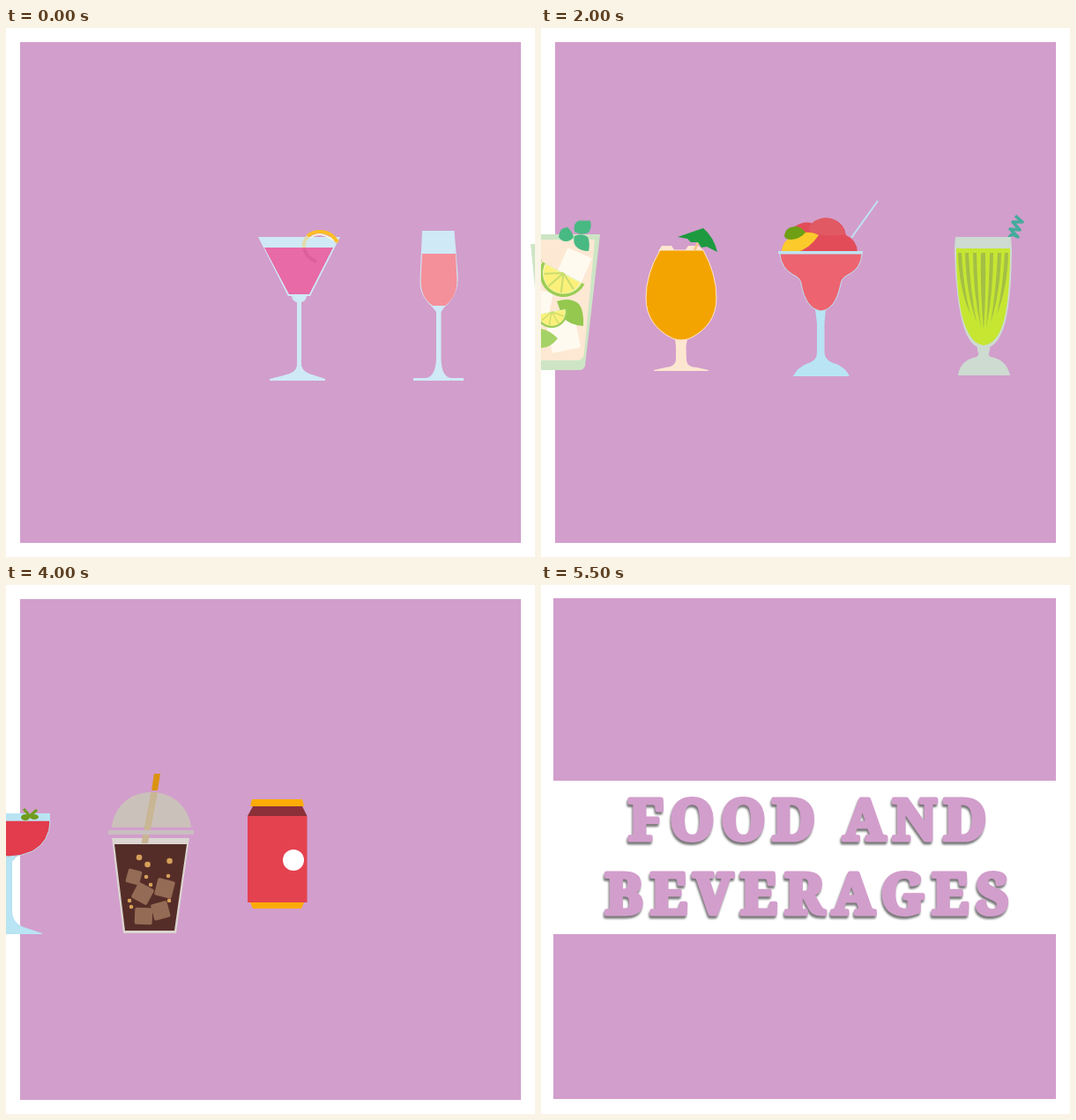
An HTML page that plays this animation: 600x600 px, repeating every 6000 ms.

```html
<!DOCTYPE html>
<html lang="en">
<head>
<meta charset="utf-8">
<title>Food and beverages</title>
<style>
  html, body { margin: 0; width: 100%; height: 100%; overflow: hidden; background: #fff; }
  svg { display: block; width: 100vw; height: 100vh; }

  .row { animation: slide 6s step-end infinite, fade 6s step-end infinite; }
  .ghost {
    filter: brightness(0) invert(1);
    animation: slide 6s step-end infinite, ghost 6s step-end infinite;
  }
  .banner { animation: banner 6s step-end infinite; }
  .title {
    font: 700 64px "Noto Serif", "Liberation Serif", serif;
    text-anchor: middle;
    fill: #d29ecc; stroke: #d29ecc; stroke-width: 5; stroke-linejoin: round;
    filter: drop-shadow(-1px 3px 1px #777);
    animation: title 6s step-end infinite;
  }

  /* One jump per drink, each with its own small vertical shift */
  @keyframes slide {
    0%      { transform: translate(636px, 11px); }
    8.333%  { transform: translate(453px, 14px); }
    16.666% { transform: translate(301px, 1px); }
    25%     { transform: translate(150px, 0); }
    33.333% { transform: translate(0, 0); }
    41.666% { transform: translate(-192px, 0); }
    50%     { transform: translate(-360px, -8px); }
    58.333% { transform: translate(-534px, 1px); }
    66.666%, 100% { transform: translate(-659px, 1px); }
  }
  @keyframes fade {
    0%      { opacity: 1; }
    75%     { opacity: .833; }
    78.333% { opacity: .667; }
    81.666% { opacity: .5; }
    85%     { opacity: .333; }
    88.333% { opacity: .167; }
    91.666%, 100% { opacity: 0; }
  }
  @keyframes ghost {
    0% { opacity: 0; }
    75% { opacity: 1; }
    85%, 100% { opacity: 0; }
  }
  @keyframes banner {
    0% { opacity: 0; }
    81.666% { opacity: .5; }
    85%, 100% { opacity: 1; }
  }
  @keyframes title {
    0% { opacity: 0; }
    91.666%, 100% { opacity: 1; }
  }
</style>
</head>
<body>
<svg viewBox="0 0 600 600">
  <defs>
    <clipPath id="band"><rect y="222" width="600" height="174"/></clipPath>

    <g id="lime">
      <path fill="#9ccd55" d="M-27 0A27 27 0 0 0 27 0Z"/>
      <path fill="#f7f8c4" d="M-23.500 0A23.500 23.500 0 0 0 23.500 0Z"/>
      <path fill="#fbf07a" d="M-22 1A22 22 0 0 0 22 1Z"/>
      <path stroke="#c9dd70" stroke-width="2" d="M0 0L-19 11M0 0L-8 21M0 0L8 21M0 0L19 11"/>
    </g>

    <g id="martini">
      <path fill="#cfe9f6" d="M286 237H379L345 304H341Q340 310 335 311V383Q337 391 350 394L362 398V400H299V398L315 394Q329 391 330 383V311Q325 310 324 304H320Z"/>
      <path fill="#e86aa6" d="M293 249H371L344 302H321Z"/>
      <g fill="none" stroke-width="4">
        <path stroke="#de609b" d="M338 250Q341 261 352 265"/>
        <path stroke="#e2ddab" d="M343 236Q337 241 338 249"/>
        <path stroke="#fdbd27" d="M342 236Q348 231 356 231Q369 231 376 243"/>
        <path stroke="#fff6dc" stroke-width="1.500" d="M345 238Q357 229 371 241"/>
      </g>
    </g>

    <g id="flute" fill="#cfe9f6">
      <path d="M472 230H508.500L512.500 280Q514 303 497 317L493.500 322V375Q494 396 505 397H519V400H462V397H476Q487 396 488 375V322L484 317Q468 303 469.500 285Z"/>
      <path fill="#f4909a" d="M472 256H510L511.500 285Q512 305 498 315H484Q470 306 470.500 285Z"/>
    </g>

    <g id="mojito">
      <path fill="#cde5c5" d="M260 235H368L351 384Q350 389 344 389H282Q276 389 275 384Z"/>
      <path fill="#fde8d3" d="M265 241H362L350 370Q349 378 342 378H286Q279 378 278 370Z"/>
      <g fill="#fffaf0">
        <rect x="268" y="252" width="31" height="33" rx="2" transform="rotate(-10 283 268)"/>
        <rect x="280" y="298" width="32" height="32" rx="2" transform="rotate(12 296 314)"/>
        <rect x="310" y="334" width="33" height="33" rx="2" transform="rotate(-12 326 350)"/>
        <rect x="324" y="255" width="30" height="30" rx="2" transform="rotate(24 339 270)"/>
      </g>
      <g fill="#a5d266">
        <path d="M275 281Q275 262 288 261Q295 259 302 264Q298 280 287 280Q280 278 275 281Z"/>
        <path fill="#94c84f" d="M319 311Q334 306 344 314Q350 322 349 339Q333 338 326 329Q322 320 319 311Z"/>
        <path d="M283 357Q290 343 301 342Q311 344 320 353Q311 365 299 364Q290 363 283 357Z"/>
      </g>
      <use href="#lime" transform="translate(326.500 279) rotate(28)"/>
      <use href="#lime" transform="translate(313 323) rotate(-11) scale(.67)"/>
      <g fill="#48b982">
        <path d="M321 238Q322 227 331 227Q336 231 338 238Q335 243 329 243Q324 243 321 238Z"/>
        <path d="M339 232Q337 222 344 219.500H357Q359 228 355 233Q347 237 339 232Z"/>
        <path d="M339 237Q347 233 354 238Q357 245 355 254Q345 254 340 248Q337 243 339 237Z"/>
      </g>
    </g>

    <g id="juice" fill="#fde6d0">
      <path d="M434 254L438 248H449L453 254ZM464 254L468 248H480L486 254Z"/>
      <path d="M453 354H467L465.500 362L466 378Q467 386 478 386L491 389V390H429V389L442 386Q453 385 454 378V362Z"/>
      <path fill="#f4a400" stroke="#fde6d0" d="M436 253H485Q500 280 500 307Q500 338 470 353Q460 357 450 353Q420 338 420 307Q420 280 436 253Z"/>
      <path stroke="#f3c48f" stroke-width="3" d="M480 243L475 253"/>
      <path fill="#1d9a40" d="M456 238L485 228Q497 238 501 255L489 249L483 250L479 244L471 244L467 240Z"/>
    </g>

    <g id="margarita">
      <path stroke="#bfe3f3" stroke-width="2" d="M382 196L352 238"/>
      <path fill="#e24c58" d="M280 254Q283 232 288 225Q300 218 308 222Q318 212 332 217Q344 222 346 235Q358 240 359 254Z"/>
      <path fill="#e15a63" d="M304 231Q304 219 318 216Q340 214 345 234Q322 238 304 231Z"/>
      <path fill="#fcca2b" d="M273 253Q274 240 289 234Q304 229 315 235Q304 251 290 254H274Z"/>
      <path fill="#6e9f14" d="M276 236Q277 225 290 225Q297 227 300 232Q294 239 284 240Q277 240 276 236Z"/>
      <path fill="#b8e4f4" d="M311 319H323L321.500 335V368Q322 378 335 381Q345 385 350 395H286Q291 385 301 381Q313 378 313 368V335Z"/>
      <path fill="#ed6470" stroke="#bbe2f0" d="M271 256H364Q363 272 350 279Q341 283 340 290Q334 320 317 321Q300 318 295 290Q294 283 286 280Q272 272 271 256Z"/>
      <path fill="#bfe3f0" d="M269 253H365V256H269Z"/>
    </g>

    <g id="cooler">
      <path fill="none" stroke="#45ab9c" stroke-width="3.500" stroke-linejoin="round" d="M527 250Q527 240 534 234L541 237L532 228L543 229L535 220L546 220L538 213"/>
      <path fill="#cddbd1" d="M470 237H533L534 250Q534 300 527 332Q521 356 509 362V366Q506 371 510 373Q528 376 532 394H473Q475 377 494 373Q498 370 495 366V362Q483 356 477 330Q470 300 469 250Z"/>
      <path fill="#c6e632" d="M471 250H532Q532 300 526 328Q519 358 502 360Q486 358 478 328Q471 300 471 250Z"/>
      <path fill="#a4bf45" d="M473 255h4Q479 295 487 325Q474 295 473 255M481 255h4Q487 300 494 334Q482 300 481 255M490 255h4Q495 300 499 340Q490 300 490 255M499 255h5Q505 300 502 343Q498 300 499 255M509 255h4Q513 300 505 340Q508 300 509 255M518 255h4Q521 300 510 334Q516 300 518 255M526 255h4Q529 295 517 325Q524 295 526 255"/>
    </g>

    <g id="coupe" fill="#b8e4f4">
      <path d="M423 258H517V267H423ZM461 306H480L474 313V368Q474 382 487 387L508 394V395H432V394L452 387Q466 382 466 368V313Z"/>
      <path fill="#e23c4d" stroke="#bfe0ee" d="M423 266H517Q517 290 497 301Q484 307 470 307Q456 307 443 301Q423 290 423 266Z"/>
      <path stroke="#bfe0ee" d="M423 266H517"/>
      <path fill="none" stroke="#719c1c" stroke-width="3" d="M487 253L494 261L502 254"/>
      <g fill="#719c1c">
        <ellipse cx="489" cy="262.500" rx="5" ry="3.500"/>
        <ellipse cx="499" cy="262" rx="5" ry="3"/>
      </g>
    </g>

    <g id="coffee">
      <path fill="#cbc1bb" d="M120 275Q122 255 138 243Q150 235 165 235Q181 235 193 244Q208 256 210 275ZM116 278H213V283H116Z"/>
      <path fill="#dcd5d1" d="M120 287H208L193 395H133Z"/>
      <path fill="#c8b694" d="M164.500 235H172L161 293H153.500ZM160 287"/>
      <path fill="#c9bec0" d="M116 278H213V283H116Z"/>
      <path fill="#db9312" d="M168 214H175L172 233H165Z"/>
      <path fill="#552d28" d="M123 294H205L191 392H135Z"/>
      <g fill="#946b55">
        <rect x="137" y="323" width="16" height="16" rx="2" transform="rotate(15 145 331)"/>
        <rect x="145" y="340" width="20" height="20" rx="2" transform="rotate(28 155 350)"/>
        <rect x="170" y="334" width="20" height="20" rx="2" transform="rotate(14 180 344)"/>
        <rect x="166" y="360" width="19" height="19" rx="2" transform="rotate(-15 175 370)"/>
        <rect x="146" y="366" width="20" height="19" rx="2" transform="rotate(2 156 375)"/>
      </g>
      <g stroke="#d6a059" stroke-linecap="round">
        <path stroke-width="6.500" d="M151 309h.1M185.500 313h.1M160.500 317h.1"/>
        <path stroke-width="4.500" d="M159 331h.1M184 330h.1M164 340h.1M140 358h.1M142 365h.1M185 358h.1"/>
      </g>
    </g>

    <g id="can">
      <path fill="#fcab07" d="M279 243H336L338 251H277ZM277 360H338L335 367H280Z"/>
      <path fill="#8b3038" d="M280 251H336L341.500 262H274Z"/>
      <path fill="#e4424f" d="M274 262H341.500V360H274Z"/>
      <circle cx="326" cy="312" r="12" fill="#fff"/>
    </g>

    <g id="drinks">
      <g transform="translate(-636 -11)"><use href="#martini"/><use href="#flute"/></g>
      <g transform="translate(-301 -1)"><use href="#mojito"/><use href="#juice"/></g>
      <use href="#margarita"/>
      <use href="#cooler"/>
      <use href="#coupe" x="192"/>
      <g transform="translate(659 -1)"><use href="#coffee"/><use href="#can"/></g>
    </g>
  </defs>

  <rect x="16" y="16" width="568" height="568" fill="#d29ecc"/>
  <g class="banner">
    <rect width="600" height="600" fill="#fff"/>
    <rect x="14" y="15" width="570" height="568" fill="#d29ecc"/>
    <rect y="222" width="600" height="174" fill="#fff"/>
  </g>
  <g clip-path="url(#band)"><use class="ghost" href="#drinks"/></g>
  <use class="row" href="#drinks"/>
  <g class="title">
    <text x="306" y="289" letter-spacing="7.500">FOOD AND</text>
    <text x="306" y="373" letter-spacing="8.500">BEVERAGES</text>
  </g>
</svg>
</body>
</html>
```
